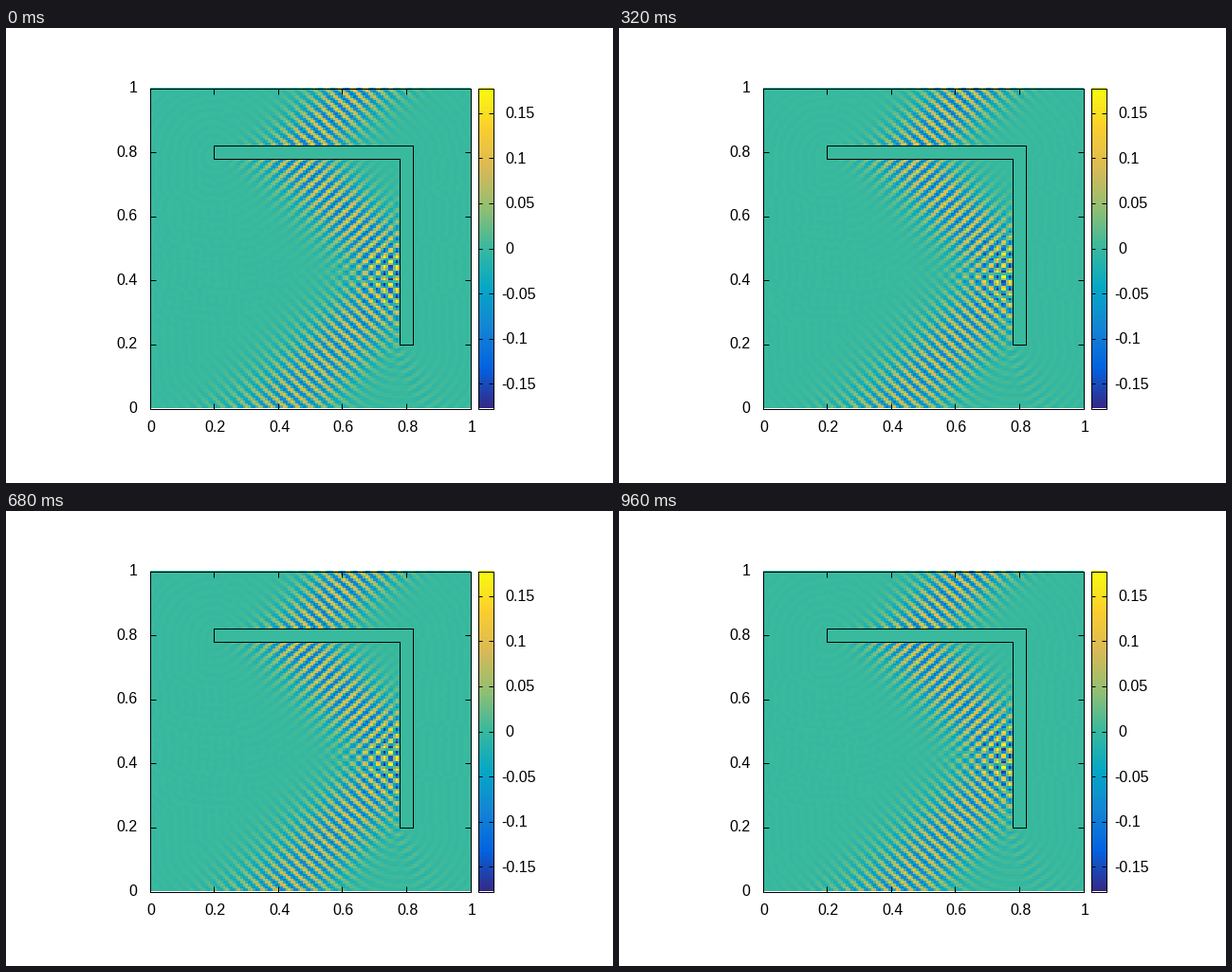
Recreate the animation shown at these times as a matplotlib script. Size 640 px wide and 480 px high, loop 1 s.

```python
import numpy as np
import matplotlib.pyplot as plt
from matplotlib.animation import FuncAnimation
from matplotlib.colors import LinearSegmentedColormap

FRAMES, INTERVAL = 25, 40
WAVELENGTH = 0.0265
K = 2 * np.pi / WAVELENGTH
CELLS = 128
LIMIT = 0.1775
STEP = 0.0025                       # boundary panel length
LEFT, RIGHT, TOP, BOTTOM = 151.5, 489.5, 63.5, 401.5
CORNERS = np.array([(0.2, 0.78), (0.2, 0.82), (0.82, 0.82),
                    (0.82, 0.2), (0.78, 0.2), (0.78, 0.78)])
PARULA = LinearSegmentedColormap.from_list("parula", [
    "#352a87", "#0363e1", "#1485d4", "#06a7c6", "#38b99e",
    "#92bf73", "#d9ba56", "#fcce2e", "#f9fb0e"], N=256)

# Slowly varying factor of the Hankel function, tabulated from its integral.
_v = np.linspace(0, 6, 500)
_x = np.geomspace(0.02, 500, 1500)
_amp = np.trapezoid(np.exp(-_v**2) / np.sqrt(1 + 0.5j * _v**2 / _x[:, None]),
                    _v, axis=1) if hasattr(np, "trapezoid") else np.trapz(
    np.exp(-_v**2) / np.sqrt(1 + 0.5j * _v**2 / _x[:, None]), _v, axis=1)


def hankel0(x):
    slow = np.interp(x, _x, _amp)
    return 2 * np.sqrt(2 / x) / np.pi * np.exp(1j * (x - np.pi / 4)) * slow


def beam(x, y, through=(0.455, 0.78), angle=np.radians(48.5), waist=0.1,
         amplitude=0.12):
    """Gaussian beam travelling up and to the right."""
    dx, dy = x - through[0], y - through[1]
    along = dx * np.cos(angle) + dy * np.sin(angle)
    across = dy * np.cos(angle) - dx * np.sin(angle)
    spread = 1 + 2j * along / (K * waist**2)
    return amplitude / np.sqrt(spread) * np.exp(
        1j * K * along - across**2 / (waist**2 * spread))


def boundary():
    pieces = []
    for a, b in zip(CORNERS, np.roll(CORNERS, -1, axis=0)):
        n = round(np.hypot(*(b - a)) / STEP)
        pieces.append(a + (b - a) * ((np.arange(n) + 0.5) / n)[:, None])
    return np.concatenate(pieces).T


def scattered_field():
    """Single-layer solution that cancels the beam on the obstacle."""
    bx, by = boundary()
    r = np.hypot(bx[:, None] - bx, by[:, None] - by)
    np.fill_diagonal(r, STEP)
    matrix = hankel0(K * r)
    np.fill_diagonal(matrix, 1 + 2j / np.pi * (
        np.log(K * STEP / 4) + np.euler_gamma - 1))
    density = np.linalg.solve(matrix, -beam(bx, by))

    grid = (np.arange(CELLS) + 0.5) / CELLS
    rows = []
    for y in grid:
        r = np.hypot(grid[:, None] - bx, y - by)
        rows.append(hankel0(K * np.maximum(r, STEP / 2)) @ density)
    return np.array(rows)


def px(x):
    return LEFT + x * (RIGHT - LEFT)


def py(y):
    return BOTTOM - y * (BOTTOM - TOP)


fig = plt.figure(figsize=(6.4, 4.8), dpi=100, facecolor="white")
ax = fig.add_axes([0, 0, 1, 1])
ax.set(xlim=(0, 640), ylim=(480, 0))
ax.axis("off")


def line(xs, ys):
    ax.plot(xs, ys, color="black", lw=0.72, zorder=4,
            solid_capstyle="butt", solid_joinstyle="miter")


def box(x0, x1, y0, y1):
    line([x0, x1, x1, x0, x0], [y0, y0, y1, y1, y0])


def label(x, y, text, ha):
    ax.text(x, y, text, ha=ha, va="baseline", family="Liberation Sans",
            fontsize=11.52)


field = scattered_field()
image = ax.imshow(field.real, extent=(LEFT, RIGHT, BOTTOM, TOP), cmap=PARULA,
                  vmin=-LIMIT, vmax=LIMIT, origin="lower", aspect="auto",
                  interpolation="nearest")
ax.imshow(np.linspace(1, 0, 256)[:, None], extent=(497.5, 513.5, BOTTOM, TOP),
          cmap=PARULA, aspect="auto", interpolation="nearest")
ax.set(xlim=(0, 640), ylim=(480, 0))

ax.fill(px(CORNERS[:, 0]), py(CORNERS[:, 1]), facecolor=PARULA(0.5),
        edgecolor="black", lw=0.72, zorder=3, joinstyle="miter")
box(LEFT, RIGHT, TOP, BOTTOM)
box(497.5, 513.5, TOP, BOTTOM)

for i in range(6):
    value = i / 5
    x, y = px(value), py(value)
    line([x, x], [BOTTOM, BOTTOM - 6])
    line([x, x], [TOP, TOP + 6])
    line([LEFT, LEFT + 6], [y, y])
    line([RIGHT, RIGHT - 6], [y, y])
    label(x + 1.5, 426.5, f"{value:g}", "center")
    label(138.5, y + 4.5, f"{value:g}", "right")

for i in range(-3, 4):
    value = i / 20
    y = py(0.5 + value / (2 * LIMIT))
    line([497.5, 502], [y, y])
    line([513.5, 509], [y, y])
    label(522 if i < 0 else 526, y + 5.5, f"{value:g}", "left")


def update(frame):
    phase = 2 * np.pi * frame / FRAMES
    image.set_data((field * np.exp(-1j * phase)).real)
    return [image]


animation = FuncAnimation(fig, update, frames=FRAMES, interval=INTERVAL,
                          repeat=True, repeat_delay=0)
plt.show()
```
